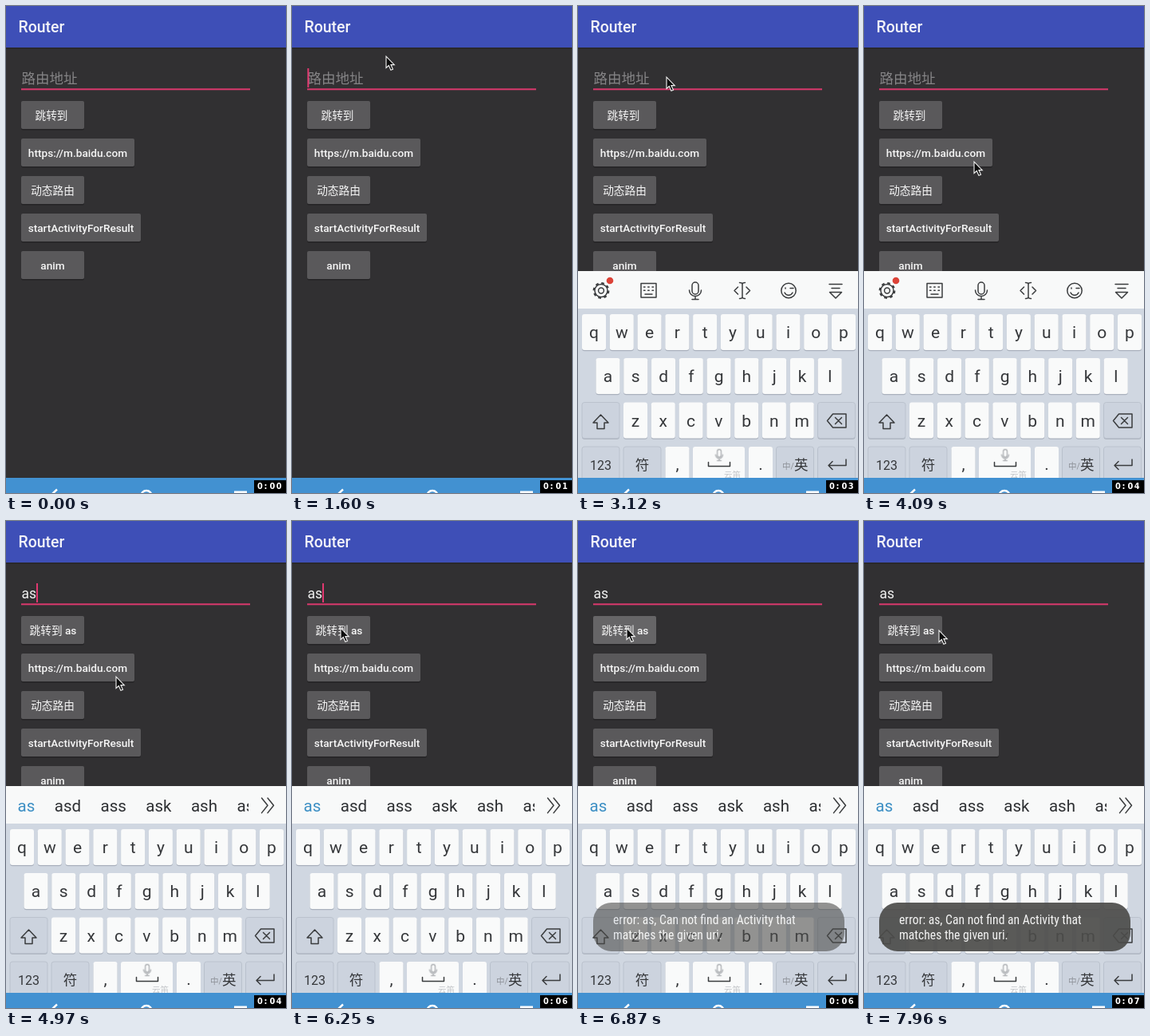
Write an HTML page that moves like this. It is 351 by 610 pixels and loops after 8 s.

```html
<!DOCTYPE html>
<html lang="zh-CN">
<head>
<meta charset="utf-8">
<title>Router</title>
<style>
  html, body { margin: 0; width: 100%; height: 100%; overflow: hidden; background: #313032; }
  svg { display: block; font-family: Roboto, "Noto Sans CJK SC", "Noto Sans CJK", sans-serif; }
  .mid { text-anchor: middle; }
  .label { font-size: 13.65px; font-weight: 500; fill: #f6f6f6; }
  .field { font-size: 17.55px; }
  .key { font-size: 21px; fill: #35373a; }
  .icon { fill: none; stroke: #3a3c3e; stroke-width: 1.5; stroke-linejoin: round; stroke-linecap: round; }
  .words { font-size: 20.5px; fill: #2e3033; }
  .toast { font: 15.7px "Roboto Condensed", Roboto, sans-serif; font-stretch: 75%; fill: #f4f4f4; }
  .clock { font: bold 9.8px "DejaVu Sans", sans-serif; fill: #fff; }
</style>
</head>
<body>
<svg id="stage" width="351" height="610" viewBox="0 0 351 610"></svg>
<script>
const LOOP = 8000;

const box = (x, y, w, h, fill, r = 0, more = '') =>
  `<rect x="${x}" y="${y}" width="${w}" height="${h}" rx="${r}" fill="${fill}" ${more}/>`;
const text = (x, y, str, cls = '', more = '') =>
  `<text x="${x}" y="${y}" class="${cls}" ${more}>${str}</text>`;
const group = (id, body) => `<g id="${id}">${body}</g>`;
const path = d => `<path d="${d}"/>`;

// App screen
function button(y, w, label, id = '') {
  return box(19, y + 1.5, w, 35, '#242325', 2) +
    box(19, y, w, 35, '#5a595b', 2, id && `id="${id}"`) +
    text(19 + w / 2, y + 22.5, label, 'label mid');
}

const jump = (id, x, label) => group(id, text(x, 141.5, label, 'label mid'));

const screen =
  box(0, 0, 351, 610, '#313032') +
  box(0, 52, 351, 2, '#29282b') +
  box(0, 0, 351, 52, '#3e4fb7') +
  text(15.5, 33, 'Router', '', 'font-size="19.5" font-weight="500" fill="#f3f3f8"') +
  box(19, 103.3, 287, 2, '#da386d') +
  group('hint', text(19.5, 97, '路由地址', 'field', 'fill="#858486"')) +
  group('typedA', text(19.5, 97, 'a', 'field', 'fill="#f0f0f0"')) +
  group('typedAs', text(19.5, 97, 'as', 'field', 'fill="#f0f0f0"')) +
  group('caret', box(0, 78, 2, 24, '#e0386f')) +
  button(119, 79, '', 'go') +
  jump('goEmpty', 57, '跳转到') + jump('goA', 59, '跳转到 a') + jump('goAs', 59, '跳转到 as') +
  button(166, 142, 'https://m.baidu.com') +
  button(213, 79, '动态路由') +
  button(260, 150, 'startActivityForResult') +
  button(307, 79, 'anim');

// Keyboard
function key(x, y, w, special) {
  return box(x, y + 1.3, w, 45, '#aab1bd', 3) +
    box(x, y, w, 45, special ? '#ccd3de' : '#f9fafa', 3, special ? 'stroke="#b7bec9" stroke-width=".8"' : '');
}

const letterRow = (letters, center, y) => [...letters].map((c, i) => {
  const x = center + i * 34.78;
  return key(x - 15, y, 30) + text(x, y + 30, c, 'key mid');
}).join('');

const mic = 'M143 350a4 4 0 0 1 8 0v7a4 4 0 0 1 -8 0zM139.5 356a7.5 7.5 0 0 0 15 0M147 363.5v4M143 367.5h8';

const tools =
  `<g class="icon"><circle cx="29" cy="356.5" r="3.4"/><circle cx="29" cy="356.5" r="8"/>
   <circle cx="29" cy="356.5" r="9.3" stroke-width="2.2" stroke-linecap="butt" stroke-dasharray="3.6 3.7"/>` +
  path('M79 347.5h19v17.5h-19zM82.5 352h1.5M87.7 352h1.5M93 352h1.5M82.5 356.3h1.5M87.7 356.3h1.5M93 356.3h1.5M84 361h9') +
  path(mic) +
  path('M206 347.5v18M202.5 346.5q3.5 0 3.5 2q0 -2 3.5 -2M202.5 366.5q3.5 0 3.5 -2q0 2 3.5 2M200.5 352l-4.5 4.5 4.5 4.5M211 352l4.5 4.5 -4.5 4.5') +
  `<circle cx="264" cy="356.5" r="9.2"/>` +
  path('M260 353v1M266 353.5h4M259 359a5.5 5.5 0 0 0 10 0') +
  path('M315 348.5h16M318 353.5h10M315.5 358.5h15l-7.5 7.5z') +
  `</g><circle cx="40" cy="344" r="4.3" fill="#dc4338"/>`;

// First word highlighted; the rest runs on and is cut by the expand arrow
function words(id, list) {
  const spans = list.map((w, i) => i
    ? `<tspan dx="24.5">${w}</tspan>`
    : `<tspan fill="#3c8fc4">${w}</tspan>`).join('');
  return group(id, box(0, 332, 351, 47, '#f8f9f9') +
    text(14.5, 363.5, spans, 'words', 'clip-path="url(#strip)"') +
    `<g class="icon">${path('M320.5 347l7.5 9.3 -7.5 9.3M328 347l7.5 9.3 -7.5 9.3')}</g>`);
}

const bottomKeys = [[5, 47, 1], [57, 47, 1], [109.5, 30], [144, 65], [214, 30], [248.5, 47, 1], [300.5, 47, 1]];

const keyboard = group('keyboard',
  box(0, 332, 351, 290, '#d0d7e1') +
  box(0, 332, 351, 47, '#f8f9f9') +
  tools +
  words('wordsA', ['a', 'and', 'are', 'at', 'as', 'all', 'any']) +
  words('wordsAs', ['as', 'asd', 'ass', 'ask', 'ash', 'asked']) +
  letterRow('qwertyuiop', 20, 386) +
  letterRow('asdfghjkl', 37.5, 441) +
  key(5, 496.5, 47, 1) + letterRow('zxcvbnm', 72, 496.5) + key(300.5, 496.5, 47, 1) +
  bottomKeys.map(([x, w, s]) => key(x, 552, w, s)).join('') +
  text(28.5, 580.5, '123', 'key mid', 'style="font-size:16px"') +
  text(80.5, 581, '符', 'key mid', 'style="font-size:17.5px"') +
  text(124.5, 581, ',', 'key mid') + text(229, 581, '.', 'key mid') +
  text(256, 580, '中/', '', 'font-size="10.5" fill="#8c9097"') +
  text(271, 581, '英', 'key', 'style="font-size:17.5px"') +
  text(183, 591, '云笛', '', 'font-size="10.5" fill="#c3c6ca"') +
  `<g class="icon">` +
  path('M28.5 512l9.5 10h-5v7.5h-9v-7.5h-5z') +
  path('M319.5 511h16.5v17h-16.5l-7 -8.5zM322.5 515.5l8 8M330.5 515.5l-8 8') +
  path('M163.5 571.5v5h27v-5') +
  path('M336 568v7.5h-22M319 570.5l-5 5 5 5') +
  `</g><g class="icon" style="stroke:#a5a8ac;stroke-width:2" transform="translate(88.8 330.5) scale(.6 .65)">${path(mic)}</g>`);

const toast = group('toast',
  box(19, 478, 315, 61, '#4c4c4a', 23, 'fill-opacity=".92"') +
  text(44, 505, 'error: as, Can not find an Activity that', 'toast') +
  text(44, 523.7, 'matches the given uri.', 'toast'));

const navBar =
  box(0, 591, 351, 19, '#4291d1') +
  `<g fill="none" stroke="#fff" stroke-width="2.4">
   ${path('M64 605.5l-7.5 7')}<circle cx="176" cy="614" r="7"/></g>` +
  box(286, 607.5, 16, 6, '#fff');

const clock = box(311, 594, 40, 16, '#000') +
  text('315 323.5 330.5 338.8', 605, '0:0', 'clock') +
  [0, 1, 2, 3, 4, 5, 6, 7].map(n => group('sec' + n, text(338.8, 605, n, 'clock'))).join('');

const pointer = group('pointer',
  `<path d="M0 0v14.5l3.3 -3 2.6 5.8 2.6 -1.1 -2.6 -5.6h4.4z" fill="#0c0c0c" stroke="#f2f2f2" stroke-width="1.1"/>`);

const stage = document.getElementById('stage');
stage.innerHTML =
  '<defs><clipPath id="strip"><rect x="0" y="332" width="304" height="47"/></clipPath></defs>' +
  screen + keyboard + toast + navBar + clock + pointer;

// Each step [time, value] holds until the next one
function hold(id, prop, steps) {
  const frames = steps.map(([t, v]) => ({ offset: t / LOOP, [prop]: v, easing: 'steps(1, end)' }));
  frames.push({ offset: 1, [prop]: steps[steps.length - 1][1] });
  document.getElementById(id).animate(frames, { duration: LOOP, iterations: Infinity });
}
const show = (id, from, to) => {
  const steps = from ? [[0, 0], [from, 1]] : [[0, 1]];
  if (to < LOOP) steps.push([to, 0]);
  hold(id, 'opacity', steps);
};
const at = (x, y) => `translate(${x}px, ${y}px)`;

function travel(start, end, count, a, b) {
  return Array.from({ length: count }, (_, i) => {
    const u = (i + 1) / count, e = u * u * (3 - 2 * u);
    return [start + (end - start) * i / (count - 1),
      at(Math.round(a[0] + (b[0] - a[0]) * e), Math.round(a[1] + (b[1] - a[1]) * e))];
  });
}

const A_KEY = 4620, S_KEY = 4970;

show('hint', 0, A_KEY);
show('goEmpty', 0, A_KEY);
for (const id of ['typedA', 'goA', 'wordsA']) show(id, A_KEY, S_KEY);
for (const id of ['typedAs', 'goAs', 'wordsAs']) show(id, S_KEY, LOOP);

const blinks = [180, 630, 1170, 1690, 1950, 2660, 3290, 3740, 4270, 5520, 6050, 6700, 7230, 7780];
hold('caret', 'opacity', [[0, 0], ...blinks.map((t, i) => [t, 1 - i % 2])]);
hold('caret', 'transform', [[0, at(19.3, 0)], [A_KEY, at(28.5, 0)], [S_KEY, at(38, 0)]]);

const ticks = [0, 990, 2040, 3120, 4090, 5160, 6160, 7420, LOOP];
for (let n = 0; n < 8; n++) show('sec' + n, ticks[n], ticks[n + 1]);

hold('keyboard', 'opacity', [[0, 0], [2140, .32], [2230, .75], [2310, 1]]);
hold('keyboard', 'transform', [[0, at(0, 30)], [2230, at(0, 11)], [2310, at(0, 0)]]);

hold('pointer', 'transform', [
  [0, at(140, -30)],
  ...travel(1260, 1690, 6, [139, -12], [111, 89]),
  ...travel(3470, 4090, 8, [111, 89], [138, 195]),
  ...travel(5520, 6250, 9, [138, 195], [61, 134]),
  [7960, at(94, 137)]
]);

hold('go', 'fill', [[0, '#5a595b'], [6520, '#666567'], [6960, '#5a595b']]);
hold('toast', 'opacity', [[0, 0], [6700, .12], [6790, .4], [6870, .65], [6960, .88], [7050, 1]]);
</script>
</body>
</html>
```
